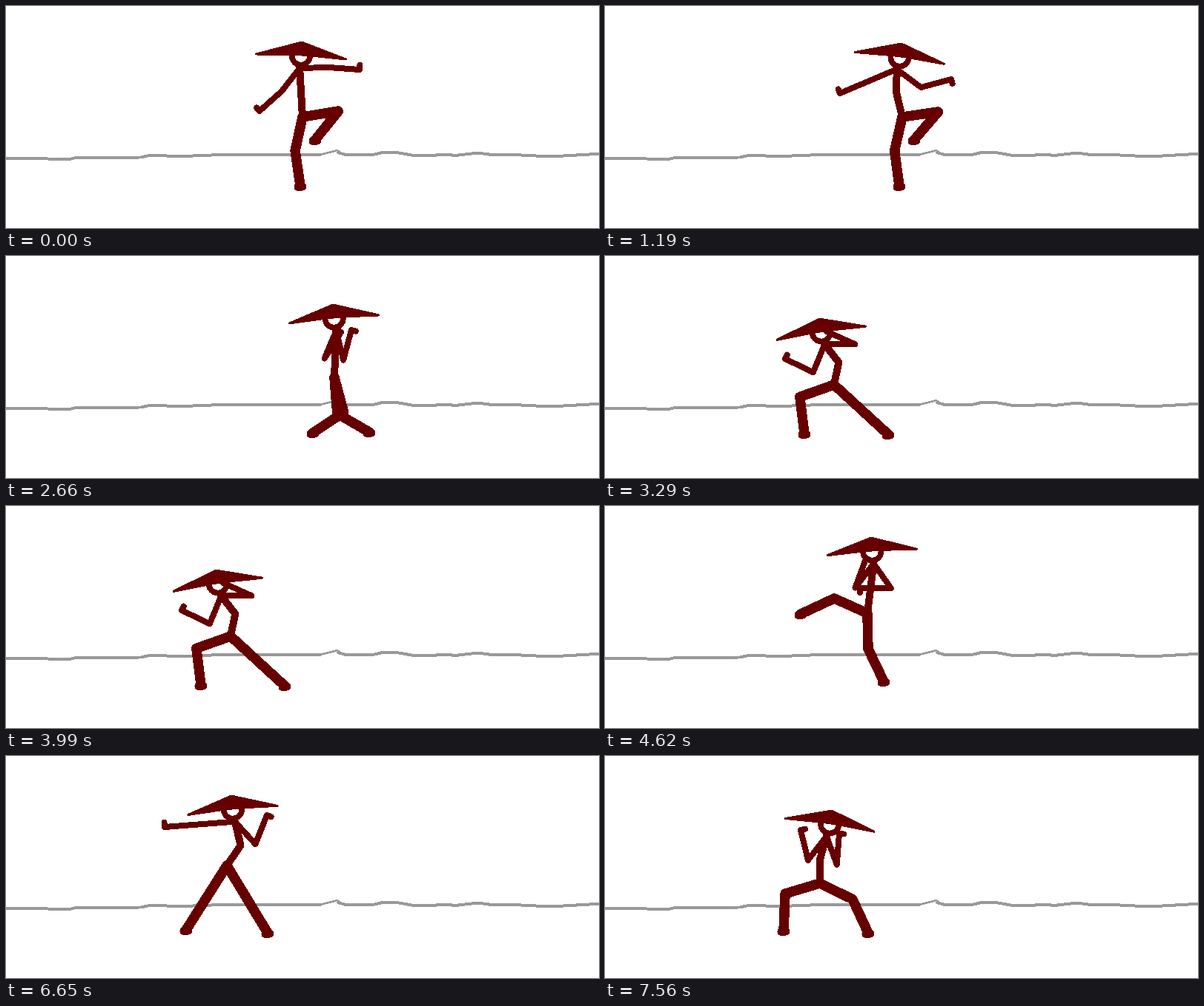
Animation, 800 px wide and 300 px high, one loop 7.7 s. Source, as an HTML page:

```html
<!DOCTYPE html>
<html lang="en">
<head>
<meta charset="utf-8">
<title>Stick fighter</title>
<style>
html, body { margin: 0; width: 100%; height: 100%; overflow: hidden; background: #fff; }
svg { display: block; width: 800px; height: 300px; shape-rendering: crispEdges; }
path, circle { fill: none; stroke: #600; stroke-linecap: round; stroke-linejoin: round; }
#ground path { stroke: #999; stroke-width: 4; }
#ground .thin { stroke-width: 2.6; }
#legs { stroke-width: 13.5; }
#feet { stroke-width: 11; }
#body { stroke-width: 10; }
#arms { stroke-width: 8; }
#hat { fill: #600; stroke-width: 3; }
#head { stroke-width: 7.6; }
</style>
</head>
<body>
<svg viewBox="0 0 800 300">
  <g id="ground">
    <path d="M-4 205.500L86 207L94 205L182 204.500L193 202L240 203L290 201L424 201"/>
    <path class="thin" d="M424 201L447 195L452 199"/>
    <path d="M448 198L458 201L495 201L510 197.500L530 198.500L550 202L575 202L592 200.500L606 202L637 198.500L655 201L685 201L735 203.500L804 199.500"/>
  </g>
  <path id="legs"/>
  <path id="feet"/>
  <path id="body"/>
  <circle id="head" r="12.2"/>
  <path id="arms"/>
  <path id="hat"/>
</svg>
<script>
const LOOP = 7700, STEP = 70;
// steps that keep the previous drawing
const held = new Set([18, 20, 35, 37, 44, 46, 54, 56, 76, 78, 80, 83, 107, 109]);

// hat: apex and tilt; all others: end point and bend of the middle joint
const pose = (hat, spine, armA, armB, legA, legB) => ({ hat, spine, armA, armB, legA, legB });

const each = (p, f) => Object.fromEntries(Object.entries(p).map(([k, v]) => [k, f(v, k)]));
const move = (p, dx, dy, changes) =>
  ({ ...each(p, ([x, y, z]) => [x + dx, y + dy, z]), ...changes });

function mirror(p, cx) {
  const m = each(p, ([x, y, z]) => [2 * cx - x, y, -z]);
  return pose(m.hat, m.spine, m.armB, m.armA, m.legB, m.legA);
}

const crane = pose([399, 49, 3.3], [400, 150, .4],
  [342, 142, -.3], [477, 86, -.2], [397, 243, .5], [417, 181, -1]);
const shuffle = pose([441, 66, -5.2], [443, 164, 0],
  [452, 103, 1], [466, 100, 1], [414, 239, -1], [490, 238, 1]);
const guard = pose([283, 87, -8.6], [303, 176, -.75],
  [237, 141, -1], [293, 104, 1], [263, 242, 1], [376, 243, 0]);
const kick = pose([359, 43, -4], [354, 145, 0],
  [352, 71, -1], [344, 111, -1], [264, 146, 1], [376, 237, .7]);
const bow = pose([327, 73, -5.7], [321, 167, -1],
  [327, 153, 1], [335, 94, 1], [245, 235, 0], [353, 239, -1]);
const horse = pose([306, 74, 8.4], [290, 172, .6],
  [264, 100, -1], [316, 105, 1], [241, 236, 1], [355, 239, -1]);

const spread = move(crane, 0, 0, { hat: [400, 51, 7.5], spine: [401, 150, .7],
  armA: [317, 118, -1], armB: [467, 99, 1] });
const windup = move(kick, 24, 9, { armB: [448, 100, -1], legA: [322, 186, 1], legB: kick.legB });
const landing = move(guard, -28, -14, { armA: [206, 112, -1], legA: [207, 236, 1], legB: [330, 238, -.5] });
const reach = move(bow, -23, -19, { armA: [214, 96, -1], armB: [352, 80, 1],
  legA: [243, 235, 0], legB: bow.legB });

// time, pose, eased arrival
const keys = [
  [0, crane],
  [1190, spread, 1],
  [1400, move(spread, 1, 1)],
  [2240, move(mirror(guard, 429), 0, -6), 1],
  [2380, move(shuffle, 82, 9)],
  [2520, move(shuffle, 34, 4)],
  [2660, shuffle],
  [3010, move(guard, 39, -6, { legB: [394, 237, 0] })],
  [3150, move(guard, 14, -2)],
  [3430, move(guard, -2, -2)],
  [3990, guard, 1],
  [4340, windup, 1],
  [4620, kick],
  [4830, move(kick, -93, 9)],
  [4970, landing],
  [5250, move(landing, 6, 2, { legA: landing.legA })],
  [5390, move(bow, -28, -2, { legA: [240, 235, 0] })],
  [5530, move(bow, -6, -2)],
  [5880, bow, 1],
  [6650, reach, 1],
  [7420, horse, 1],
  [LOOP, horse]
];

function poseAt(t) {
  let i = 1;
  while (i < keys.length - 1 && keys[i][0] <= t) i++;
  const [t0, p] = keys[i - 1], [t1, q, eased] = keys[i];
  let u = (t - t0) / (t1 - t0);
  if (eased) u *= u * (3 - 2 * u);
  return each(p, (v, k) => v.map((n, j) => n + (q[k][j] - n) * u));
}

const el = id => document.getElementById(id);
const [legs, feet, body, head, arms, hat] =
  ['legs', 'feet', 'body', 'head', 'arms', 'hat'].map(el);
const line = (...pts) => 'M' + pts.map(p => p[0].toFixed(2) + ' ' + p[1].toFixed(2)).join('L');

// two bones of given lengths between root and end
function limb(root, [x, y, bend], upper, lower) {
  const dx = x - root[0], dy = y - root[1], d = Math.hypot(dx, dy) || 1;
  const along = d < upper + lower ? (d * d + upper * upper - lower * lower) / (2 * d) : d / 2;
  const out = bend * Math.sqrt(Math.max(0, upper * upper - along * along));
  const joint = d < upper + lower ? out : 0;
  return [root, [root[0] + (dx * along - dy * joint) / d, root[1] + (dy * along + dx * joint) / d], [x, y]];
}

function arm(neck, v, side) {
  const pts = limb(neck, v, 41, 42);
  const [, [ex, ey], [hx, hy]] = pts;
  const len = Math.hypot(hx - ex, hy - ey) || 1;
  const fist = side * 6 * Math.max(-1, Math.min(1, v[2] * 5));
  return line(...pts, [hx - (hy - ey) / len * fist, hy + (hx - ex) / len * fist]);
}

function draw(p) {
  const [x0, y0, tilt] = p.hat;
  const fromHat = (x, y, lean = 1) => {
    const a = tilt * lean * Math.PI / 180, c = Math.cos(a), s = Math.sin(a);
    return [x0 + x * c - y * s, y0 + x * s + y * c];
  };
  const neck = fromHat(0, 35, 1.4);
  const hip = p.spine.slice(0, 2);
  const pair = [p.legA, p.legB];
  legs.setAttribute('d', pair.map(v => line(...limb(hip, v, 49, 50))).join(''));
  feet.setAttribute('d', pair.map(([x, y]) => line([x - 3, y + 1.5], [x + 3, y + 1])).join(''));
  body.setAttribute('d', line(...limb(neck, p.spine, 33, 33)));
  arms.setAttribute('d', arm(neck, p.armA, -1) + arm(neck, p.armB, 1));
  hat.setAttribute('d', line(fromHat(-60.5, 19.5), [x0, y0], fromHat(60.5, 19.5),
    fromHat(8, 17), fromHat(-8, 17)) + 'Z');
  const [hx, hy] = fromHat(0, 18.5);
  head.setAttribute('cx', hx);
  head.setAttribute('cy', hy);
}

let start, shown = -1;
function tick(now) {
  if (start === undefined) start = now;
  let n = Math.floor((now - start) % LOOP / STEP);
  if (held.has(n)) n--;
  if (n !== shown) draw(poseAt((shown = n) * STEP));
  requestAnimationFrame(tick);
}
draw(poseAt(0));
requestAnimationFrame(tick);
</script>
</body>
</html>
```
